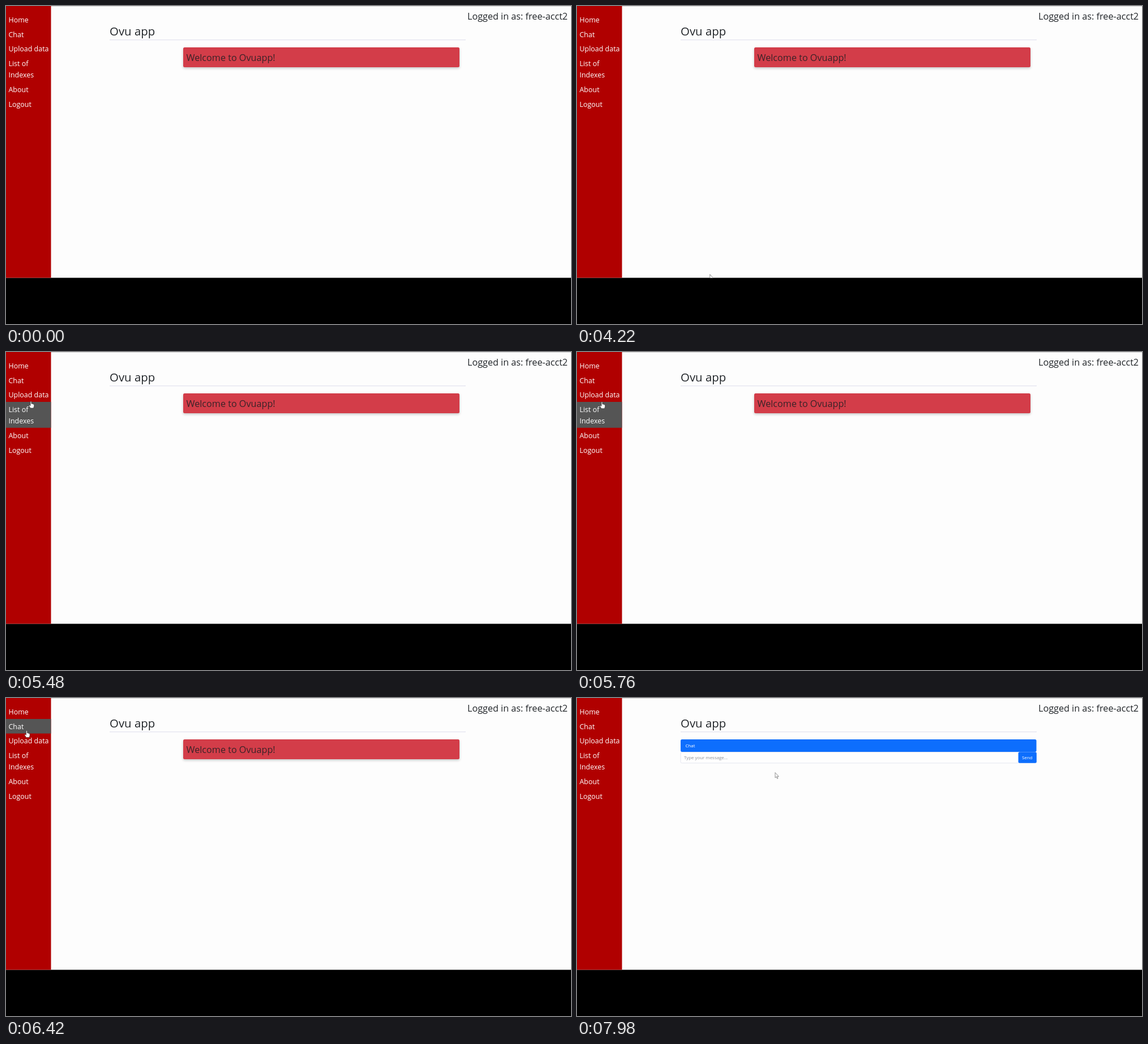
Animation, 998 px wide and 561 px high, one loop 8 s. Source, as an HTML page:

```html
<!DOCTYPE html>
<html lang="en">
<head>
<meta charset="utf-8">
<title>Chat app</title>
<style>
  html, body { margin: 0; width: 100%; height: 100%; overflow: hidden; background: #000; }
  svg { display: block; width: 100%; height: 100%; font-family: "Open Sans", "Noto Sans", sans-serif; }
  .nav { font-size: 12.45px; fill: #fff; }
  .head { font-size: 16.2px; fill: #212529; }
  .title { font-size: 20.4px; font-weight: 500; fill: #212529; }
  .small { font-size: 7.9px; fill: #fff; }
</style>
</head>
<body>
<svg viewBox="0 0 998 561">
  <defs>
    <clipPath id="page"><rect width="998" height="479.5"/></clipPath>
    <filter id="shadow" x="-5%" y="-30%" width="110%" height="180%">
      <feDropShadow dx="0" dy="2" stdDeviation="2" flood-color="#000" flood-opacity=".22"/>
    </filter>
  </defs>
  <rect width="998" height="561"/>
  <g clip-path="url(#page)">
    <rect width="998" height="480" fill="#fdfdfd"/>
    <rect width="998" height="1" fill="#d4d4d4"/>
    <rect width="79.5" height="480" fill="#b00000"/>
    <rect id="hoverChat" y="37" width="79.5" height="25.6" fill="#555"/>
    <rect id="hoverList" y="88" width="79.5" height="45.7" fill="#555"/>
    <g id="nav" class="nav"></g>
    <text class="head" x="815" y="24.3" font-weight="500">Logged in as: free-acct2</text>
    <text class="title" x="183" y="51.5">Ovu app</text>
    <rect x="183" y="59.3" width="629" height="1" fill="#dcdcec"/>

    <g id="welcome">
      <rect x="313" y="73" width="488" height="35" rx="2.5" fill="#d33d48" filter="url(#shadow)"/>
      <text class="head" x="318.5" y="97" style="fill:#3a2328">Welcome to Ovuapp!</text>
    </g>

    <g id="chat">
      <rect x="183" y="73" width="628.5" height="22" rx="2.5" fill="#0d6efd"/>
      <text class="small" x="191.5" y="86.8">Chat</text>
      <rect x="183" y="95.5" width="598" height="19.3" rx="2.5" fill="#fefefe" stroke="#dfe0ee" stroke-width=".8"/>
      <text class="small" x="189" y="108" style="fill:#8d9096">Type your message...</text>
      <rect x="779.5" y="95.2" width="32.3" height="19.6" rx="2.5" fill="#0d6efd"/>
      <text class="small" x="786" y="108">Send</text>
    </g>

    <path id="arrow" d="M0 0V9.2L2.1 7.3L3.6 10.8L5 10.2L3.5 6.9H6.3Z" fill="#fff" stroke="#777" stroke-width=".8"/>
    <path id="hand" d="M-.9.6Q0-.6.9.6V4.2Q2.2 3.6 2.7 4.6Q3.9 4.1 4.2 5.2Q5.6 4.9 5.6 6.3V8.8L4.5 12H-.7L-3.4 8Q-3.5 6.4-2 6.8L-.9 7.8Z" fill="#fff" stroke="#333" stroke-width=".6"/>
  </g>
</svg>
<script>
const LOOP = 8000, ENTER = 4220, SWITCH = 7680, FADE = 300;
const $ = id => document.getElementById(id);

const links = [["Home", 28.8], ["Chat", 54.7], ["Upload data", 80.4], ["List of", 106.4],
  ["Indexes", 125.8], ["About", 151.8], ["Logout", 177.6]];
$("nav").innerHTML = links.map(([s, y]) => `<text x="4.5" y="${y}">${s}</text>`).join("");

// Pointer tip: time, x, y
const path = [
  [4220, 235, 474], [4560, 160, 300], [4860, 68, 128], [5040, 52, 112],
  [5480, 44, 87], [5840, 44, 88], [6020, 33, 59], [6600, 38, 57],
  [7100, 44, 53], [7560, 44, 53], [7680, 110, 72], [7860, 315, 124], [7980, 350, 131.5]
];

const clamp = p => Math.max(0, Math.min(1, p));
const fade = (t, start) => 1 - (1 - clamp((t - start) / FADE)) ** 2;
const show = (id, on) => $(id).style.display = on ? "" : "none";

function pointer(t) {
  const i = path.findIndex(k => k[0] > t);
  if (i < 0) return path.at(-1).slice(1);
  const [t0, x0, y0] = path[Math.max(0, i - 1)], [t1, x1, y1] = path[i];
  const p = t1 > t0 ? (t - t0) / (t1 - t0) : 0;
  return [x0 + (x1 - x0) * p, y0 + (y1 - y0) * p];
}

function draw(t) {
  const [x, y] = pointer(t), inNav = x < 79.5, chat = t >= SWITCH;
  show("welcome", !chat);
  show("chat", chat);
  show("arrow", t >= ENTER && !inNav);
  show("hand", t >= ENTER && inNav);
  for (const id of ["arrow", "hand"]) $(id).setAttribute("transform", `translate(${x} ${y})`);
  $("hoverList").setAttribute("opacity", fade(t, 4860) - fade(t, 5860));
  $("hoverChat").setAttribute("opacity", chat ? 0 : fade(t, 5900) - fade(t, 7620));
}

function tick() {
  draw(performance.now() % LOOP);
  requestAnimationFrame(tick);
}
tick();
</script>
</body>
</html>
```
